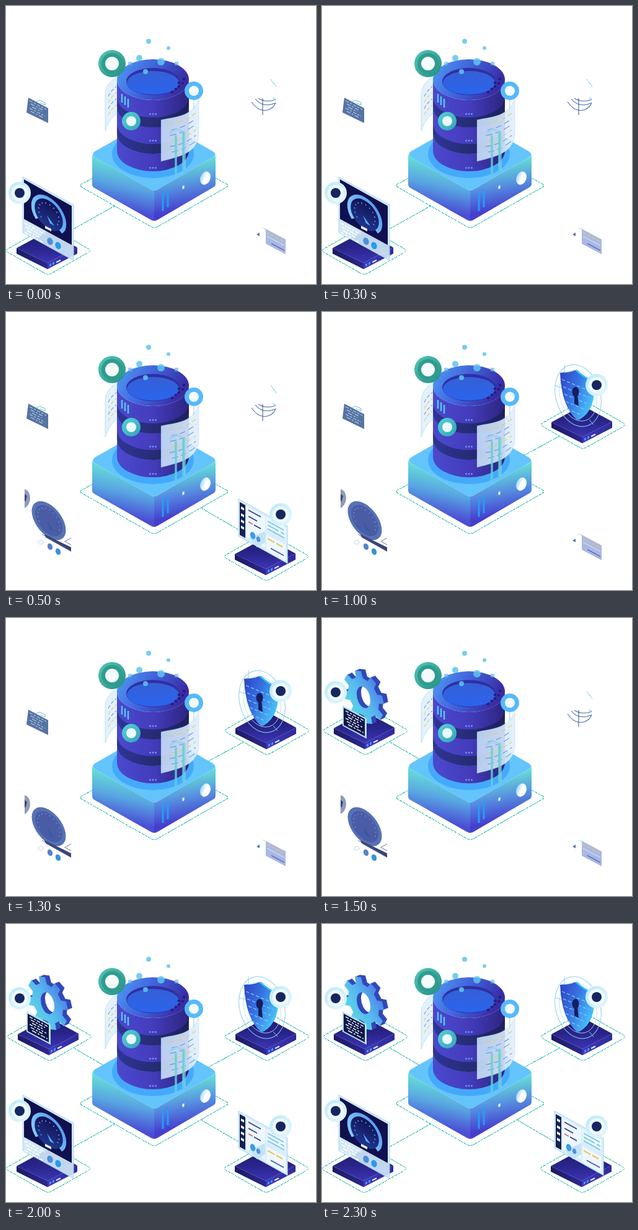
Write an HTML page that moves like this. It is 500 px wide and 449 px high and loops after 2.5 s.

```html
<!DOCTYPE html>
<html lang="en">
<head>
<meta charset="utf-8">
<title>Isometric server</title>
<style>
html, body { margin: 0; width: 100%; height: 100%; overflow: hidden; background: #fff; }
svg { display: block; width: 500px; height: 449px; }
path, ellipse { fill: none; }
.thin { stroke: #35bfb0; stroke-width: 1; stroke-dasharray: 5 1; shape-rendering: crispEdges; }
</style>
</head>
<body>
<script>
const P = (d, fill, extra = '') => `<path d="${d}" style="fill:${fill}" ${extra}/>`;
const S = (d, color, width = 1, extra = '') => `<path d="${d}" stroke="${color}" stroke-width="${width}" ${extra}/>`;
const thin = d => `<path class="thin" d="${d}"/>`;
const E = (x, y, rx, ry, fill, extra = '') =>
  `<ellipse cx="${x}" cy="${y}" rx="${rx}" ry="${ry}" style="fill:${fill}" ${extra}/>`;
const C = (x, y, r, fill, extra) => E(x, y, r, r, fill, extra);
const G = (transform, ...parts) => `<g transform="${transform}">${parts.join('')}</g>`;
const at = (x, y) => `translate(${x} ${y})`;
// Plane of the left-facing wall: x runs down to the right.
const wall = (x, y, slope = .55) => `matrix(1 ${slope} 0 1 ${x} ${y})`;
const grad = (id, x1, y1, x2, y2, colors, units = '') =>
  `<linearGradient id="${id}" x1="${x1}" y1="${y1}" x2="${x2}" y2="${y2}" ${units}>` +
  colors.map((c, i) => `<stop offset="${i / (colors.length - 1)}" stop-color="${c}"/>`).join('') +
  '</linearGradient>';
const user = 'gradientUnits="userSpaceOnUse"';

const defs = '<defs>' +
  grad('leftFace', 186, 252, 170, 324, ['#66dfd6', '#58a5e2', '#4a4ed4'], user) +
  grad('rightFace', 292, 252, 306, 324, ['#66dfd6', '#5690e0', '#453fcd'], user) +
  grad('body', 0, 0, 1, 0, ['#4b49ce', '#443cbc', '#2c2580']) +
  grad('gap', 0, 0, 1, 0, ['#2f3596', '#272c76', '#1c205d']) +
  grad('rim', 0, 0, 1, .3, ['#4f9cf5', '#4165dc', '#382da5']) +
  grad('well', 0, 0, 0, 1, ['#3560d6', '#2a64ee']) +
  grad('slabTop', 0, 0, 0, 1, ['#1f1c6a', '#28248a', '#3c35b4']) +
  grad('slabLeft', 0, 0, 1, 0, ['#1c1a64', '#2b2790']) +
  grad('slabRight', 0, 0, 1, 0, ['#4038ba', '#2f2a9a']) +
  grad('gear', 0, 1, 1, 0, ['#5ce2e2', '#56b8f0', '#4a6ce0']) +
  grad('shield', 0, 0, 1, .6, ['#2f3fc0', '#3573e2', '#48bcfa']) +
  grad('gauge', 0, 1, 1, 0, ['#88cdfc', '#6eb5f5', '#5097ef']) +
  grad('dial', 0, 0, 0, 1, ['#111153', '#20378f']) +
  grad('teal', 0, 0, 1, 1, ['#52c9b8', '#268c82']) +
  grad('aqua', 0, 0, 1, 1, ['#56d2d4', '#35a2b8']) +
  grad('pale', 0, 0, 1, 1, ['#b9eafa', '#e7f7fe']) +
  grad('sheet', 0, 0, 1, 0, ['#c6def9', '#e0effd']) +
  grad('window', 0, 0, 1, 0, ['#9bd8ff', '#ffffff', '#ffffff']) +
  '</defs>';

const badge = (x, y) => C(x, y, 18, 'url(#pale)') + C(x, y, 13, '#effaff') + C(x, y, 8, '#16265f');

// Rows of broken strokes that read as code or text.
function rows(x, y, count, gap, width, color, weight) {
  let out = '';
  for (let i = 0; i < count; i++) {
    const start = x + (i % 3) * 2, end = x + width - (i * 7 % 5) * 2;
    out += S(`M${start} ${y + i * gap}H${end}`, color, weight, `stroke-dasharray="${5 + i % 3} 2 3 2"`);
  }
  return out;
}

function cylinder() {
  const side = (top, bottom, fill) =>
    P(`M179 ${top}V${bottom}A58 33 0 0 0 295 ${bottom}V${top}A58 33 0 0 1 179 ${top}Z`, fill);
  let out = '';
  for (const top of [206, 162, 119]) {
    if (top < 206) out += side(top + 20, top + 44, 'url(#gap)');
    out += side(top, top + 28, 'url(#body)');
    for (const x of [232.5, 237, 241.5]) out += C(x, top + 55.5, 1.4, '#6f96ef');
  }
  out += E(237, 119, 58, 33, 'url(#rim)') + E(237, 122, 43, 22, '#302fa5') + E(237, 124, 42, 19, 'url(#well)');
  for (const [x, y] of [[287, 118], [285, 125], [279, 130], [274, 134], [268, 139], [279, 124]])
    out += E(x, y, 2.4, 1.9, '#251d78');
  for (const [x, y] of [[187, 142], [192, 146], [197, 150]]) out += S(`M${x} ${y}v14`, '#52c8ed', 2.5);
  return out;
}

function backSheet() {
  let out = P('M180 113C169 121 160 129 160 144V202C164 190 170 179 180 173Z', '#e2f1fc', 'stroke="#a8d7ef" stroke-width=".7"');
  for (let i = 0; i < 4; i++)
    out += S(`M165 ${146 + i * 10}Q169 ${137 + i * 10} 178 ${130 + i * 10}`,
      i % 2 ? '#e8c95f' : '#7d97cc', 1.1, 'stroke-dasharray="6 3"');
  return out;
}

function frontSheet() {
  const outline = 'M250 184C275 178 299 180 311 150V209C307 236 286 242 250 251Z';
  let out = P(outline, 'url(#sheet)', 'opacity=".9"') +
    S(outline, '#85bdea', .8, 'stroke-dasharray="1 2"');
  for (let i = 0; i < 6; i++) {
    const y = 191 + i * 9;
    out += S(`M${264 + i % 2 * 3} ${y}Q287 ${y - 3} 306 ${y - 18}`, i % 3 ? '#6f93d4' : '#e9c95c', 1.1,
      `stroke-dasharray="${7 + i % 3 * 2} 5 9 6"`);
  }
  out += S('M264 205l11 -6 13 5V265', '#8dd2ef', 4, 'opacity=".6"');
  out += S('M274 209V272M286 204V265', '#5ed3d2', 3.5, 'opacity=".85"');
  return out;
}

const center =
  thin('M140 278L123 287Q117 290 123 293L233 356Q239 360 245 356L355 293Q361 290 355 287L338 278') +
  P('M143 235L233 184Q239 181 245 184L334 235Q341 240 334 244L245 296Q239 300 233 296L143 244Q137 240 143 235Z', '#64c4fc') +
  P('M139 240Q140 242 143 244L233 296Q236 298 239 298V347Q236 347 233 345L143 294Q139 292 139 288Z', 'url(#leftFace)') +
  P('M239 298Q242 298 245 296L334 244Q338 242 338 240V287Q338 291 334 293L245 345Q242 347 239 347Z', 'url(#rightFace)') +
  E(237, 239, 66, 39, '#45a9fb') +
  backSheet() + cylinder() + frontSheet() +
  S('M253 301V331M261 296V325', '#229dfa', 3) +
  E(321.5, 278, 8, 11, 'url(#window)', 'transform="rotate(22 321.5 278)"') +
  P('M284.5 291l3 -1.5v5l-3 1.5Z', '#f2fcff') +
  P('M197 90h6v6h-6ZM272 90h6v6h-6Z', '#65b6e9', 'opacity=".65"') +
  [[230, 57, 4], [262, 68, 3], [215, 84, 5], [250, 90, 6], [225, 106, 4]]
    .map(([x, y, r]) => C(x, y, r, '#5fc4ee', 'opacity=".85"')).join('') +
  C(171, 93, 22, 'url(#teal)') + C(171, 93, 17, '#2f9c90') + C(171, 93, 11, '#f4fcfb') +
  S('M303 148V166', '#94ccef', 1) + C(303, 137, 15, '#57b9fa') + C(303, 137, 8, '#f3fbff') +
  C(202, 186, 15, 'url(#aqua)') + C(202, 186, 8, '#eafafa');

const base =
  thin('M-6 -36.5Q0 -40 6 -36.5L64 -3.5Q71 0 64 3.5L6 36.5Q0 40 -6 36.5L-64 3.5Q-71 0 -64 -3.5Z') +
  P('M-51 -4L-1 20V30L-51 5Z', 'url(#slabLeft)') +
  P('M-1 20L47 -5V5L-1 30Z', 'url(#slabRight)') +
  P('M-51 -4L-1 -31L47 -5L-1 20Z', 'url(#slabTop)') +
  P('M2 22l3 -1.5v4l-3 1.5ZM7 19.5l3 -1.5v4l-3 1.5Z', '#3d9cf3') +
  S('M13 19l7 -3.5', '#d7edff', 2);

const dashboard =
  thin('M109 360L175 323') + G(at(68, 395), base) +
  P('M27 276L109 321V411L27 366Z', '#cfe6f7', 'opacity=".92" stroke="#a9d9ef"') +
  P('M29 280L106 323V386L29 344Z', '#10104f') +
  G(wall(69, 337, .56),
    C(0, 0, 23, 'url(#dial)'),
    S('M-19 17A25.5 25.5 0 1 1 19 17', 'url(#gauge)', 5.5),
    S('M-12 11A16.5 16.5 0 1 1 12 11', '#67a9f0', 2, 'stroke-dasharray="1.5 5"')) +
  P('M66 338L78 355L71 351Z', '#58aaf3') +
  P('M63 355l10 5v4l-10 -5Z', '#eef8ff') +
  G(wall(29, 350), rows(1, 0, 4, 5, 32, '#ffffff', 2)) +
  E(71, 380, 4.5, 6, '#4c8ddd', 'transform="rotate(-20 71 380)"') +
  E(84, 387, 4.5, 6, '#279ceb', 'transform="rotate(-20 84 387)"') +
  badge(22, 302);

const report =
  thin('M314 316L379 354') + G(at(420, 395), base) +
  P('M375 302L454 346V406L375 362Z', '#d9edfa', 'stroke="#a6d8f0"') +
  P('M377 307L386 312V365L377 360Z', '#162052') +
  G(wall(379, 314), ...[0, 11, 21, 31].map(y => P(`M0 ${y}h5v4h-5Z`, '#f1f9ff'))) +
  P('M388 313L418 330V380L388 363Z', '#edf7fe') +
  P('M420 331L451 348V366L420 349ZM420 359L451 376V402L420 385Z', '#edf7fe') +
  G(wall(391, 320),
    S('M0 0h20M0 10h14', '#353f99', 2), S('M0 19h7', '#e26472', 2), S('M9 19h11', '#343b8a', 2),
    S('M31 1h26M31 7h18M52 7h6M31 13h27', '#70c5f3', 2),
    S('M31 29h11M45 29h10', '#efc54e', 2.4), S('M36 42h21', '#4f55bd', 2)) +
  P('M392 365L418 354V372L405 380Z', '#c3e4f6') +
  E(398, 361, 4, 6, '#3c9be8', 'transform="rotate(-20 398 361)"') +
  E(407, 367, 3, 4.5, '#5b8dd9', 'transform="rotate(-20 407 367)"') +
  badge(443, 327);

const shieldShape = 'M384 98Q398 99 408 94Q421 106 435 112Q441 158 412 175Q386 153 384 98Z';
const security =
  thin('M325 232L384 200') + G(at(421, 182), base) +
  G('rotate(-16 413 135)',
    E(413, 135, 36, 51, 'none', 'stroke="#8ccdf0" stroke-width="1"'),
    E(413, 135, 29, 42, 'none', 'stroke="#b7e0f5" stroke-width=".8"')) +
  S('M391 85V114M376 119l10 3M431 174l7 8', '#8ccdf0') +
  P(shieldShape, '#3fc3f8', 'transform="translate(3 -1)"') +
  P(shieldShape, 'url(#shield)') +
  G(wall(387, 109, .42), ...[0, 11, 22, 33, 44].map((y, i) =>
    S(`M${i * 2} ${y}H${48 - i * 4}`, '#91cdf9', 1.2, 'stroke-dasharray="5 3"'))) +
  E(409, 129, 5.5, 8, '#151e60') + P('M407 133h5l2 19l-7 -4Z', '#151e60') +
  badge(443, 118);

function gearPath(teeth, outer, inner) {
  let d = '';
  const step = 2 * Math.PI / teeth;
  for (let i = 0; i < teeth; i++)
    for (const [turn, r] of [[-.3, inner], [-.2, outer], [.2, outer], [.3, inner]]) {
      const a = (i + turn) * step - 1.85;
      d += `${d ? 'L' : 'M'}${(r * Math.cos(a)).toFixed(1)} ${(r * Math.sin(a)).toFixed(1)}`;
    }
  return d + 'ZM-12 0A12 15 0 1 0 12 0A12 15 0 1 0 -12 0Z';
}
const gearShape = gearPath(8, 36, 27);
const gear = (x, y, fill) => G(`matrix(.92 .44 0 1.12 ${x} ${y})`, P(gearShape, fill, 'fill-rule="evenodd"'));
const settings =
  thin('M109 200L157 228') + G(at(70, 182), base) +
  [7, 5, 3, 1].map(k => gear(67 + k, 128 - k * .4, '#3247b8')).join('') + gear(67, 128, 'url(#gear)') +
  P('M33 141L72 162V195L33 174Z', '#b5def1') + P('M35 145L69 163V191L35 173Z', '#101648') +
  G(wall(38, 150, .53), rows(0, 0, 6, 4, 29, '#e8f5ff', 1.6)) +
  badge(22, 120);

// Faint remains that stay while a module is hidden.
const dashboardTrace =
  P('M30 286Q38 288 39 300Q39 311 30 317Z', '#8e9cba') + P('M30 294l4 3l-2 8l-2 1Z', '#394675') +
  G(wall(69, 337, .56),
    C(0, 0, 27.5, '#5672b5'), C(0, 0, 22, '#4a5ca6'),
    S('M-15 10A18 18 0 1 1 15 10', '#7f9fcb', 1.5, 'stroke-dasharray="1.5 5"')) +
  P('M67 338L78 355L70 351Z', '#365a9e') +
  P('M62 359L105 380V387L64 364Z', '#394476') +
  S('M58 359l46 26M94 371l11 -6M96 371l9 5', '#495980', .8) +
  E(56, 372, 4, 3, 'none', 'stroke="#a3bddd" stroke-dasharray="2 1"') +
  E(71, 379, 4, 5.5, '#5484c9', 'transform="rotate(-20 71 379)"') +
  E(84, 387, 4, 5.5, '#3993d6', 'transform="rotate(-20 84 387)"');

const reportTrace =
  P('M419 360L451 377V401L419 384Z', '#a9b8e4') +
  G(wall(421, 366, .53), S('M0 0h28', '#d8c77d', 2, 'stroke-dasharray="5 2"'),
    S('M0 6h28', '#cfdaf2', 1.5), S('M7 14h21', '#5b70bb', 1.8)) +
  P('M404 369l5 -3v6Z', '#5871b5') + S('M414 358v2M419 361l-3 -2', '#9bd1df');

const securityTrace =
  S('M396 155Q408 172 422 168Q432 165 435 156M402 150Q414 165 434 157M407 149Q419 157 435 151', '#4b6dae', 1.1) +
  S('M414 149V176', '#394f87') +
  S('M427 118l5 8M432 124l4 7', '#79d4e9') + S('M430 148l5 2', '#80c6df');

const settingsTrace =
  P('M36 148L68 165V189L33 172Z', '#5673a4') +
  G(wall(38, 153, .52), rows(0, 0, 5, 4, 27, '#bdcfe3', 1.2)) +
  S('M48 155l6 -3l9 4v4M55 156l8 4', '#64bccd');

const modules = [[dashboard, dashboardTrace], [report, reportTrace], [security, securityTrace], [settings, settingsTrace]];
document.body.innerHTML = `<svg viewBox="0 0 500 449">${defs}${center}` +
  modules.map(([full, trace]) => `<g class="full">${full}</g><g class="trace">${trace}</g>`).join('') + '</svg>';

const full = document.querySelectorAll('.full');
const traces = document.querySelectorAll('.trace');
const start = performance.now();

// Each module shows alone in turn, then all four together.
function draw() {
  const step = Math.floor((performance.now() - start) % 2500 / 500);
  full.forEach((group, i) => {
    const shown = step === 4 || step === i;
    group.style.display = shown ? '' : 'none';
    traces[i].style.display = shown ? 'none' : '';
  });
  requestAnimationFrame(draw);
}
draw();
</script>
</body>
</html>
```
